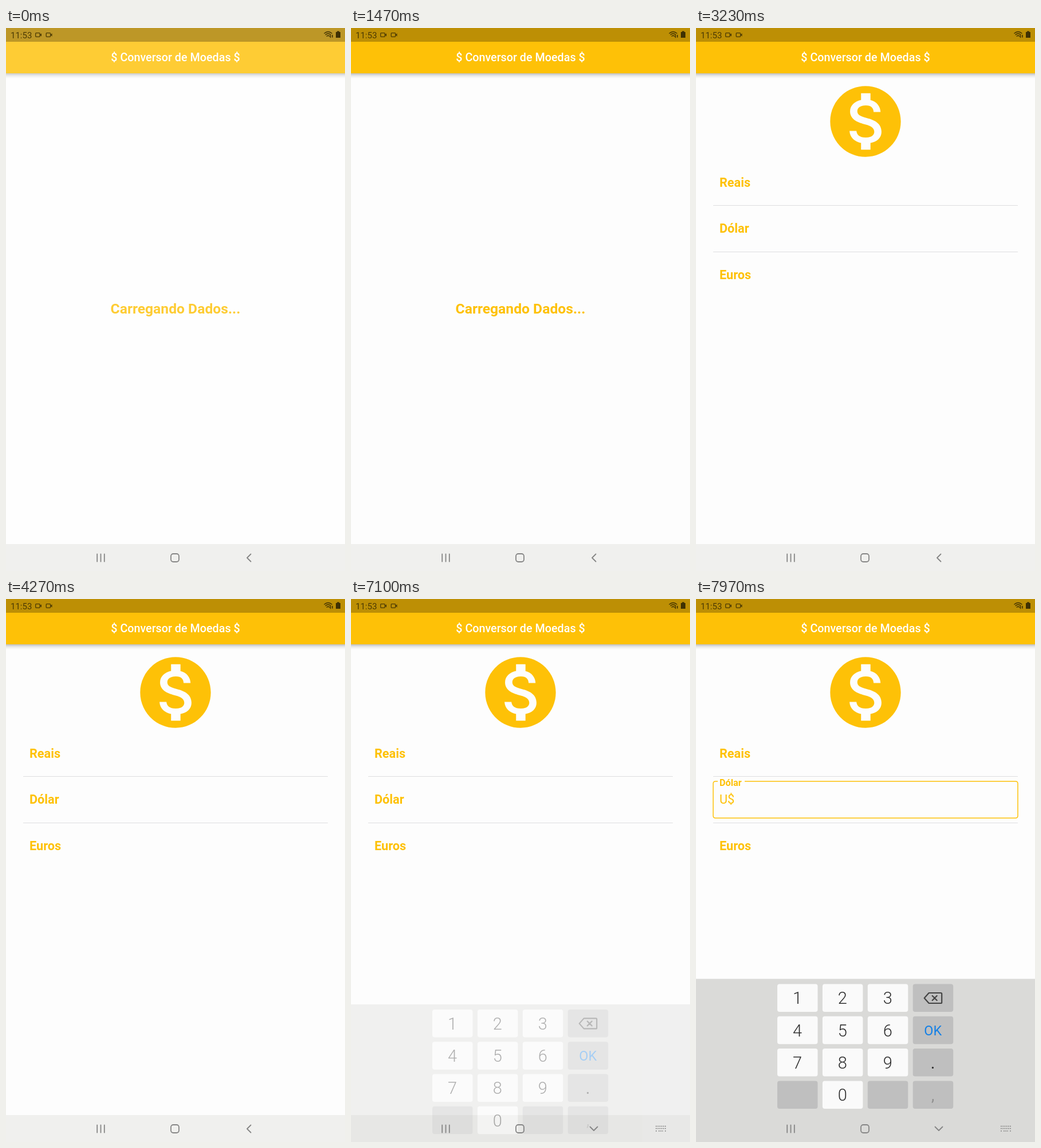
Recreate the animation shown at these times as an HTML page. Size 592 by 947 pixels, loop 8000 ms.

```html
<!DOCTYPE html>
<html lang="pt">
<head>
<meta charset="utf-8">
<title>Conversor de Moedas</title>
<style>
  html, body { margin: 0; height: 100%; overflow: hidden; background: #fdfdfd; }
  svg { display: block; width: 100%; height: 100%; font-family: Roboto, sans-serif; }
  .amber { fill: #fec107; }
  .label { font-weight: 700; font-size: 21.7px; }
  .mid { text-anchor: middle; }
  .line { fill: none; stroke-linecap: round; stroke-linejoin: round; }
</style>
</head>
<body>
<svg viewBox="0 0 592 947">
  <defs>
    <linearGradient id="shade" x2="0" y2="1">
      <stop offset="0" stop-opacity=".25"/>
      <stop offset=".45" stop-opacity=".09"/>
      <stop offset="1" stop-opacity="0"/>
    </linearGradient>
    <g id="cam">
      <rect x=".7" y=".7" width="7.4" height="6.6" rx="1" fill="none" stroke="#4b3a04" stroke-width="1.3"/>
      <path d="M8 4 11 1.2V6.8Z" fill="#4b3a04"/>
    </g>
  </defs>
  <rect width="592" height="947" fill="#fdfdfd"/>

  <text id="loading" class="amber mid" x="296" y="498" font-weight="700" font-size="24.67">Carregando Dados...</text>

  <g id="form" class="amber">
    <path transform="translate(222 89) scale(6.167)" d="M12 2C6.48 2 2 6.48 2 12s4.48 10 10 10 10-4.48 10-10S17.52 2 12 2zm1.41 16.09V20h-2.67v-1.93c-1.71-.36-3.16-1.46-3.27-3.4h1.96c.1 1.05.82 1.87 2.65 1.87 1.96 0 2.4-.98 2.4-1.59 0-.83-.44-1.61-2.67-2.14-2.48-.6-4.18-1.62-4.18-3.67 0-1.72 1.39-2.84 3.11-3.21V4h2.67v1.95c1.86.45 2.79 1.86 2.85 3.39H14.3c-.05-1.11-.64-1.87-2.22-1.87-1.5 0-2.4.68-2.4 1.64 0 .84.65 1.39 2.67 1.91s4.18 1.39 4.18 3.91c-.01 1.83-1.38 2.83-3.12 3.16z"/>
    <path d="M30 309.5H562M30 390.5H562" stroke="#dedee0"/>
    <text class="label" x="41" y="276.5">Reais</text>
    <text class="label" id="dollar">Dólar</text>
    <text class="label" x="41" y="437.7">Euros</text>
    <g id="focus">
      <path id="border" fill="none" stroke="#fec107" stroke-width="1.5"/>
      <text x="41" y="356.5" font-size="21.7">U$</text>
    </g>
  </g>

  <rect y="79" width="592" height="9" fill="url(#shade)"/>
  <rect width="592" height="79" class="amber"/>
  <text class="mid" x="296" y="58.4" font-weight="500" font-size="19.73" fill="#fff">$ Conversor de Moedas $</text>
  <rect id="veil" width="592" height="900" fill="#fff"/>

  <rect width="592" height="24" fill-opacity=".26"/>
  <text x="8" y="18" font-size="15" fill="#4b3a04">11:53</text>
  <use href="#cam" x="51" y="8"/>
  <use href="#cam" x="69.5" y="8"/>
  <g class="line" stroke="#3f3103" stroke-width="1.4">
    <path d="M556 9.3Q562.5 3.7 569 9.3M558 11.8Q562.5 7.8 567 11.8M560.2 14.2Q562.5 12.2 564.8 14.2"/>
    <path d="M566.5 13V16.5M570 12.5V16" stroke-width="1.6"/>
  </g>
  <path d="M578 5.5H582V7H584V17H576V7H578Z" fill="#3f3103"/>

  <rect y="900" width="592" height="47" fill="#f0f0ee"/>
  <g id="board">
    <rect id="tray" width="592" height="300" fill="#dadad8"/>
    <g id="keys"></g>
  </g>

  <g class="line" stroke="#858585" stroke-width="1.8">
    <path d="M159.2 917.5V930.5M165.5 917.5V930.5M171.8 917.5V930.5"/>
    <rect x="288" y="917" width="14" height="14" rx="4.2"/>
    <path id="back" d="M427.5 917.5 421 924 427.5 930.5"/>
    <path id="down" d="M417.5 920.5 424 927 430.5 920.5"/>
    <path id="switch" stroke-width="1.5" stroke-linecap="butt" d="M532 919.5H550M532 923.5H550M532 927.8H534M537 927.8H545M548 927.8H550" stroke-dasharray="2 1.2"/>
  </g>
</svg>
<script>
const $ = id => document.getElementById(id);
const clamp = v => Math.min(1, Math.max(0, v));
const easeOut = p => 1 - (1 - p) ** 3;
const easeInOut = p => p * p * (3 - 2 * p);
const span = (t, start, length) => clamp((t - start) / length);
const show = (id, on) => $(id).style.display = on ? '' : 'none';

const LOOP = 8000, LOADED = 1930, TAP = 7080, FOCUS = 7270;

const keyRows = ['123<', '456K', '789.', ' 0 ,'];

function keyFace(c, x, y) {
  const text = (s, dy, size, fill, weight) =>
    `<text class="mid" x="${x}" y="${y + dy}" font-size="${size}" fill="${fill}" font-weight="${weight}">${s}</text>`;
  if (c === '<') return `<g class="line" stroke="#444" stroke-width="2.2" transform="translate(${x} ${y})">
    <path d="M-15 0-7-9H14Q15.5-9 15.5-7.5V7.5Q15.5 9 14 9H-7ZM-1-4 7 4M7-4-1 4"/></g>`;
  if (c === 'K') return text('OK', 8.4, 23.5, '#1480e6', 400);
  if (c === ',') return text(c, 10, 27, '#8e8e8e', 400);
  return text(c, 10.4, 29, '#2c2c2c', c === '.' ? 400 : 300);
}

$('keys').innerHTML = keyRows.map((row, r) => [...row].map((c, i) => {
  const x = 142 + i * 78.9, y = 671.5 + r * 56.3;
  const fill = /\d/.test(c) ? '#fafafa' : '#bfbfbf';
  return `<rect x="${x}" y="${y}" width="70.5" height="48.5" rx="4" fill="${fill}"/>`
    + keyFace(c, x + 35, y + 24.5);
}).join('')).join('');
$('tray').setAttribute('y', 662.5);

function draw(t) {
  $('veil').setAttribute('opacity', 0.18 * (1 - span(t, 0, 150)));
  show('loading', t < LOADED);
  show('form', t >= LOADED);

  const open = t >= TAP;
  show('board', open);
  show('down', open);
  show('switch', open);
  show('back', !open);
  $('board').setAttribute('opacity', easeOut(span(t, TAP, 140)));
  $('board').setAttribute('transform', `translate(0 ${57 * (1 - easeOut(span(t, TAP, 250)))})`);

  const k = easeInOut(span(t, FOCUS, 200));
  $('dollar').setAttribute('transform', `translate(41 ${357.2 - 31.4 * k}) scale(${1 - 0.25 * k})`);
  $('focus').setAttribute('opacity', k);
  $('border').setAttribute('d',
    `M${38 + 47 * k} 318H558Q562 318 562 322V378Q562 382 558 382H34Q30 382 30 378V322Q30 318 34 318H38`);
}

let start;
function tick(now) {
  start ??= now;
  draw((now - start) % LOOP);
  requestAnimationFrame(tick);
}
draw(0);
requestAnimationFrame(tick);
</script>
</body>
</html>
```
